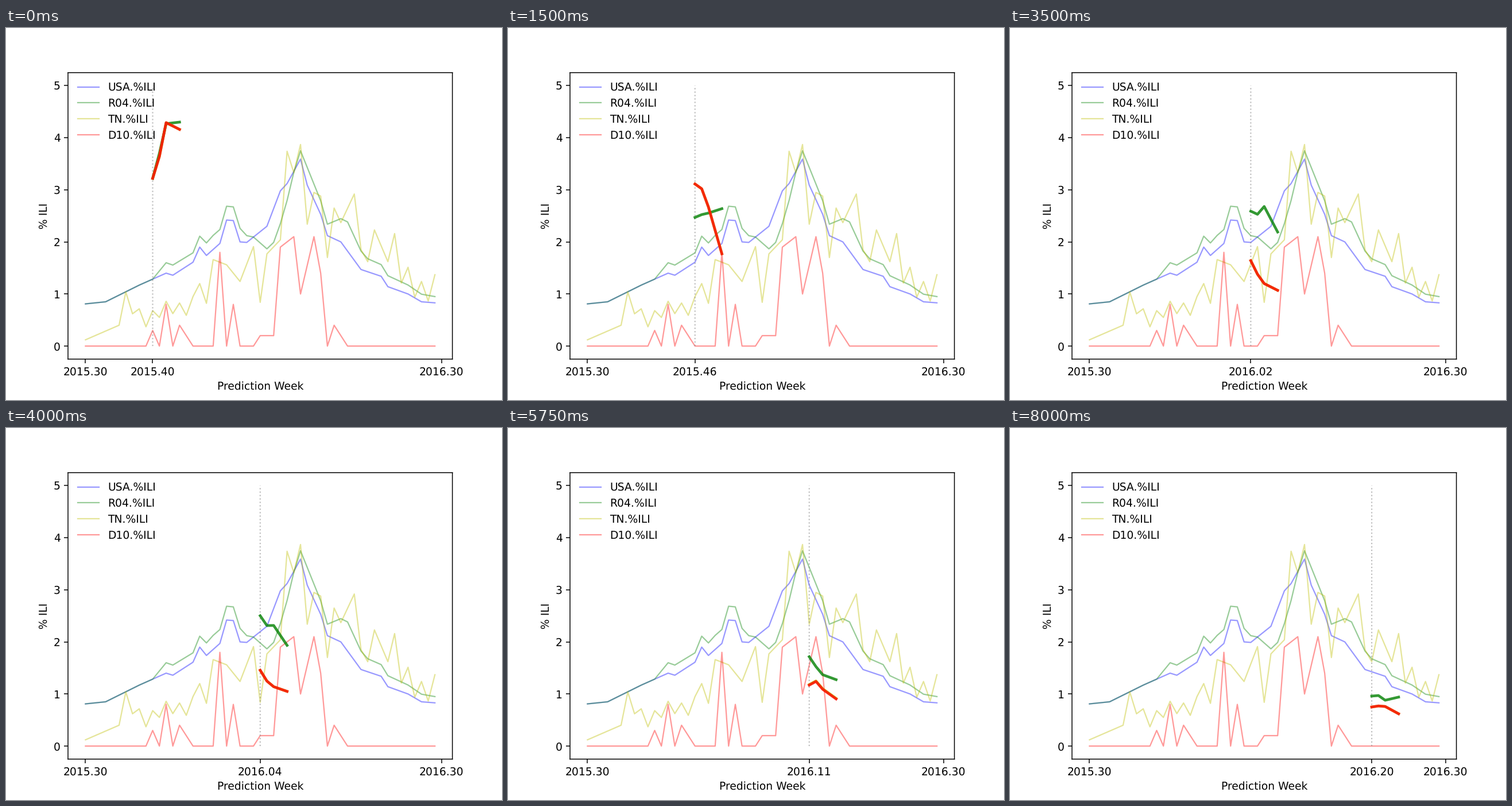
A matplotlib script that plays this animation: 864x648 px, repeating every 8.25 s.

```python
import numpy as np
import matplotlib.pyplot as plt
from matplotlib.animation import FuncAnimation

plt.rcParams.update({"font.family": "DejaVu Sans", "font.size": 10,
                     "text.hinting": "none"})

FRAMES, INTERVAL = 33, 250
FIRST_WEEK, LAST_TICK = 10, 53
weeks = np.arange(LAST_TICK)


def curve(*knots):
    return np.interp(weeks, *zip(*knots))


def zigzag(start, stop, size):
    """Swing up on even weeks and down on odd ones."""
    inside = (weeks >= start) & (weeks <= stop)
    return np.where(inside, size * (-1.0) ** weeks, 0)


usa = curve((0, .81), (3, .85), (8, 1.17), (12, 1.4), (13, 1.36), (16, 1.61),
            (17, 1.9), (18, 1.74), (20, 1.97), (21, 2.42), (22, 2.41),
            (23, 2), (24, 1.99), (27, 2.3), (29, 2.98), (30, 3.12),
            (32, 3.59), (33, 3.09), (35, 2.53), (36, 2.12), (38, 2),
            (41, 1.47), (44, 1.34), (45, 1.14), (48, 1), (50, .85), (52, .83))

# The region follows the country with a slowly changing offset.
region = usa + curve((0, 0), (10, 0), (12, .2), (16, .18), (19, .27),
                     (23, .26), (25, 0), (28, -.65), (29, -.63), (31, -.02),
                     (33, .34), (36, .22), (39, .56), (42, .25), (52, .12))

state = zigzag(6, 15, .11) + zigzag(46, 52, .22) + curve(
    (0, .12), (5, .4), (6, .93), (7, .73), (9, .48), (12, .75), (15, .7),
    (17, 1.2), (18, .82), (19, 1.66), (21, 1.56), (23, 1.24), (25, 1.91),
    (26, .84), (27, 1.77), (29, 2.04), (30, 3.74), (31, 3.33), (32, 3.87),
    (33, 2.34), (34, 2.95), (35, 2.88), (36, 1.7), (37, 2.65), (38, 2.37),
    (40, 2.92), (41, 1.85), (42, 1.62), (43, 2.23), (45, 1.62), (46, 1.94),
    (47, 1.43), (50, 1.02), (52, 1.15))

district = curve((9, 0), (10, .3), (11, 0), (12, .8), (13, 0), (14, .4),
                 (16, 0), (19, 0), (20, 1.8), (21, 0), (22, .8), (23, 0),
                 (25, 0), (26, .2), (28, .2), (29, 1.9), (31, 2.1), (32, 1),
                 (34, 2.1), (35, 1.4), (36, 0), (37, .4), (39, 0))

# Forecast values 0, 1, 2 and 4 weeks ahead, blended between key weeks.
ahead = np.array([0, 1, 2, 4])
key_weeks = [10, 14, 19, 24, 29, 37, 42]
region_keys = np.array([
    [3.22, 3.70, 4.27, 4.30], [2.41, 2.72, 2.77, 2.95],
    [2.56, 2.23, 2.23, 2.17], [2.59, 2.53, 2.68, 2.19],
    [2.37, 1.99, 1.77, 1.55], [1.06, 1.06, .97, 1.00],
    [.96, .97, .88, .94]])
district_keys = np.array([
    [3.22, 3.64, 4.29, 4.16], [3.50, 3.66, 3.03, 1.66],
    [2.53, 2.06, 2.13, 1.94], [1.64, 1.38, 1.20, 1.07],
    [1.18, 1.05, 1.05, 1.02], [1.16, 1.43, 1.13, .79],
    [.75, .77, .76, .62]])


def forecast(keys, week):
    return np.array([np.interp(week, key_weeks, column) for column in keys.T])


def week_label(i):
    return f"2015.{30 + i}" if i < 23 else f"2016.{i - 22:02d}"


fig, ax = plt.subplots(figsize=(6.4, 4.8), dpi=135)
fig.subplots_adjust(left=.125, right=.9, bottom=.11, top=.88)

for name, color, values in [("USA", "b", usa), ("R04", "g", region),
                            ("TN", "y", state), ("D10", "r", district)]:
    ax.plot(weeks, values, color=color, alpha=.4, lw=1.2,
            label=f"{name}.%ILI")

marker, = ax.plot([], [], color="gray", ls=":", lw=1.2, alpha=.5, snap=False)
region_line, state_line, district_line = (
    ax.plot([], [], color=color, lw=2.5, alpha=.8)[0] for color in "gyr")

for spine in ax.spines.values():
    spine.set_snap(False)
ax.set_xlim(-2.6, 54.6)
ax.set_ylim(-.25, 5.25)
ax.set_yticks(range(6))
ax.set_xlabel("Prediction Week")
ax.set_ylabel("% ILI")
ax.legend(loc="upper left", frameon=False)


def update(frame):
    week = FIRST_WEEK + frame
    marker.set_data([week, week], [0, 5])
    low = forecast(district_keys, week)
    gap = max(0, .09 - .02 * abs(week - 37))
    region_line.set_data(week + ahead, forecast(region_keys, week))
    state_line.set_data(week + ahead, low + gap)
    district_line.set_data(week + ahead, low)
    ax.set_xticks([0, week, LAST_TICK],
                  [week_label(0), week_label(week), "2016.30"])
    return marker, region_line, state_line, district_line


anim = FuncAnimation(fig, update, frames=FRAMES, interval=INTERVAL,
                     repeat=True, repeat_delay=0, blit=False)
plt.show()
```
